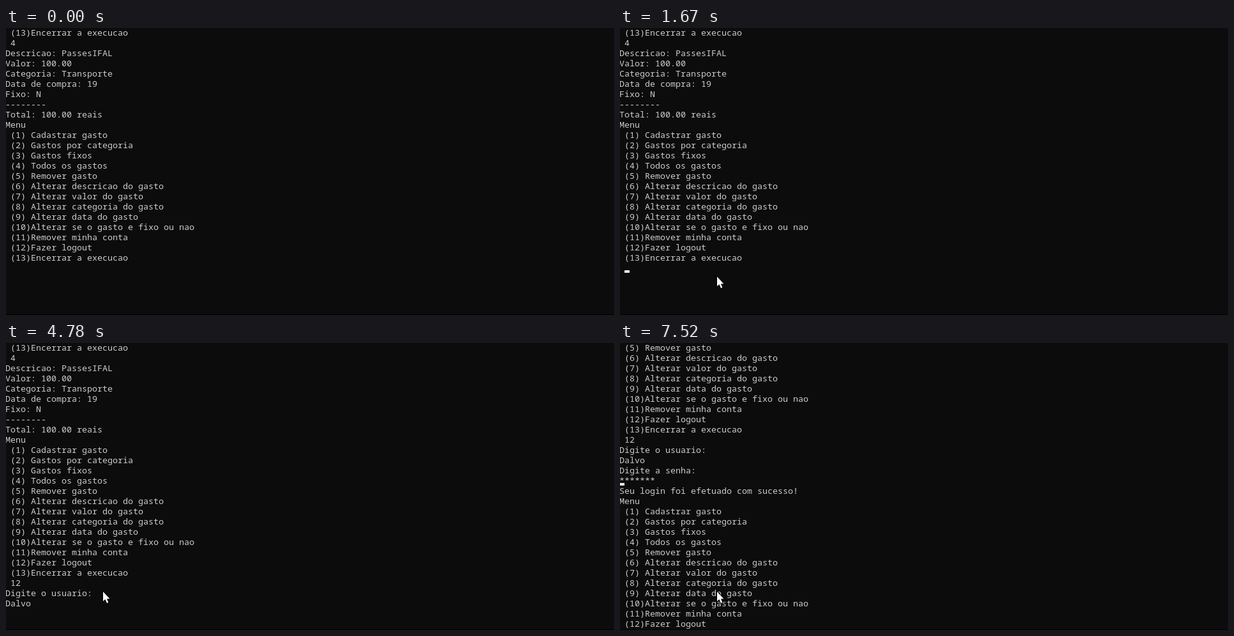
Animation of 952x449 px, one loop 8000 ms. Source, as an HTML page:

```html
<!DOCTYPE html>
<html lang="pt">
<head>
<meta charset="utf-8">
<title>Controle de gastos</title>
<style>
  html, body { margin: 0; width: 100%; height: 100%; overflow: hidden; background: #0c0c0c; }
  #stage { position: relative; width: 952px; height: 449px; overflow: hidden; background: #0c0c0c; }
  #stage::after { content: ""; position: absolute; left: 0; bottom: 0; width: 100%; height: 1px; background: #000; }
  #screen {
    position: absolute; left: -1px; top: -1px; margin: 0;
    font: calc(40px / 3)/16px "Noto Sans Mono", "DejaVu Sans Mono", monospace;
    font-variant-ligatures: none; color: #ccc;
  }
  #caret { position: absolute; left: -1px; top: 11px; width: 8px; height: 4px; background: #f3f3f3; }
  #mouse { position: absolute; left: 0; top: 0; overflow: visible; }
  #mouse path { fill: #fff; stroke: #000; stroke-width: 2; paint-order: stroke; }
</style>
</head>
<body>
<div id="stage">
  <pre id="screen"></pre>
  <div id="caret"></div>
  <svg id="mouse" width="12" height="19"><path d="M0 0V15L3.3 12L6 18L8.4 17L6 11.2H10.5Z"/></svg>
</div>
<script>
const LOOP = 8000, SCROLL_ROWS = 14;
const WAKE = 1670, ASK_USER = 2790, ASK_PASS = 5250, LOGIN = 7520;
const BLINK = 530, BLINK_PHASE = 10;
const [screen, caret, mouse] = ["screen", "caret", "mouse"].map(id => document.getElementById(id));

const menu = `Menu
 (1) Cadastrar gasto
 (2) Gastos por categoria
 (3) Gastos fixos
 (4) Todos os gastos
 (5) Remover gasto
 (6) Alterar descricao do gasto
 (7) Alterar valor do gasto
 (8) Alterar categoria do gasto
 (9) Alterar data do gasto
 (10)Alterar se o gasto e fixo ou nao
 (11)Remover minha conta
 (12)Fazer logout
 (13)Encerrar a execucao`.split("\n");

const intro = ` (13)Encerrar a execucao
 4
Descricao: PassesIFAL
Valor: 100.00
Categoria: Transporte
Data de compra: 19
Fixo: N
--------
Total: 100.00 reais`.split("\n");

// Answers typed at an even pace
const option = { word: "12", start: 2060, gap: 140 };
const user = { word: "Dalvo", start: 3910, gap: 200 };
const pass = { word: "*******", start: 5990, gap: 198 };

const clamp = (v, lo, hi) => Math.min(hi, Math.max(lo, v));
const typed = ({ word, start, gap }, t) =>
  word.slice(0, clamp(Math.floor((t - start) / gap) + 1, 0, word.length));
const keyTimes = ({ word, start, gap }) => [...word].map((_, i) => start + i * gap);

function promptLines(t) {
  const lines = [...intro, ...menu, " " + typed(option, t)];
  if (t >= ASK_USER) lines.push("Digite o usuario:", typed(user, t));
  if (t >= ASK_PASS) lines.push("Digite a senha:", typed(pass, t));
  return lines;
}

// Typing and printing show the caret, each blink tick toggles it;
// the first tick after printing is skipped.
const prints = [ASK_USER, ASK_PASS, LOGIN];
const wakeups = [WAKE, ...keyTimes(option), ...keyTimes(user), ...prints].sort((a, b) => a - b);
const ticks = t => Math.floor((t - BLINK_PHASE) / BLINK);

function caretOn(t) {
  if (t < WAKE || (t >= pass.start && t < LOGIN)) return false;
  const last = wakeups.findLast(w => w <= t);
  const skipped = prints.includes(last) ? 1 : 0;
  return Math.max(0, ticks(t) - ticks(last) - skipped) % 2 === 0;
}

// Pointer key points, sampled every FRAME ms
const FRAME = 66;
const path = [
  { at: 200, x: 828, y: 440 },
  { at: 530, x: 569, y: 371 },
  { at: 940, x: 156, y: 378 },
  { at: 1070, x: 140, y: 388 },
  { at: 1190, x: 152, y: 389 }
];

function pointerAt(t) {
  const t0 = path[0].at;
  const s = t0 + Math.floor((t - t0) / FRAME) * FRAME;
  const i = path.findLastIndex(p => p.at <= s);
  const a = path[i], b = path[Math.min(i + 1, path.length - 1)];
  const p = a === b ? 0 : (s - a.at) / (b.at - a.at);
  const easeOut = 1 - (1 - p) ** 2;
  return [a.x + (b.x - a.x) * p, a.y + (b.y - a.y) * easeOut].map(Math.round);
}

const place = (el, x, y) => { el.style.transform = `translate(${x}px, ${y}px)`; };

function draw(t) {
  let lines = promptLines(t);
  let row = lines.length - 1, col = lines[row].length;
  if (t >= LOGIN) {
    lines = [...lines, "Seu login foi efetuado com sucesso!", ...menu.slice(0, -1)].slice(SCROLL_ROWS);
    row -= SCROLL_ROWS;
    col = 0;
  }
  const text = lines.join("\n");
  if (screen.textContent !== text) screen.textContent = text;

  caret.hidden = !caretOn(t);
  place(caret, col * 8, row * 16);

  mouse.style.visibility = t < path[0].at ? "hidden" : "visible";
  if (t >= path[0].at) place(mouse, ...pointerAt(t));
}

const start = performance.now();
function tick() {
  draw((performance.now() - start) % LOOP);
  requestAnimationFrame(tick);
}
tick();
</script>
</body>
</html>
```
